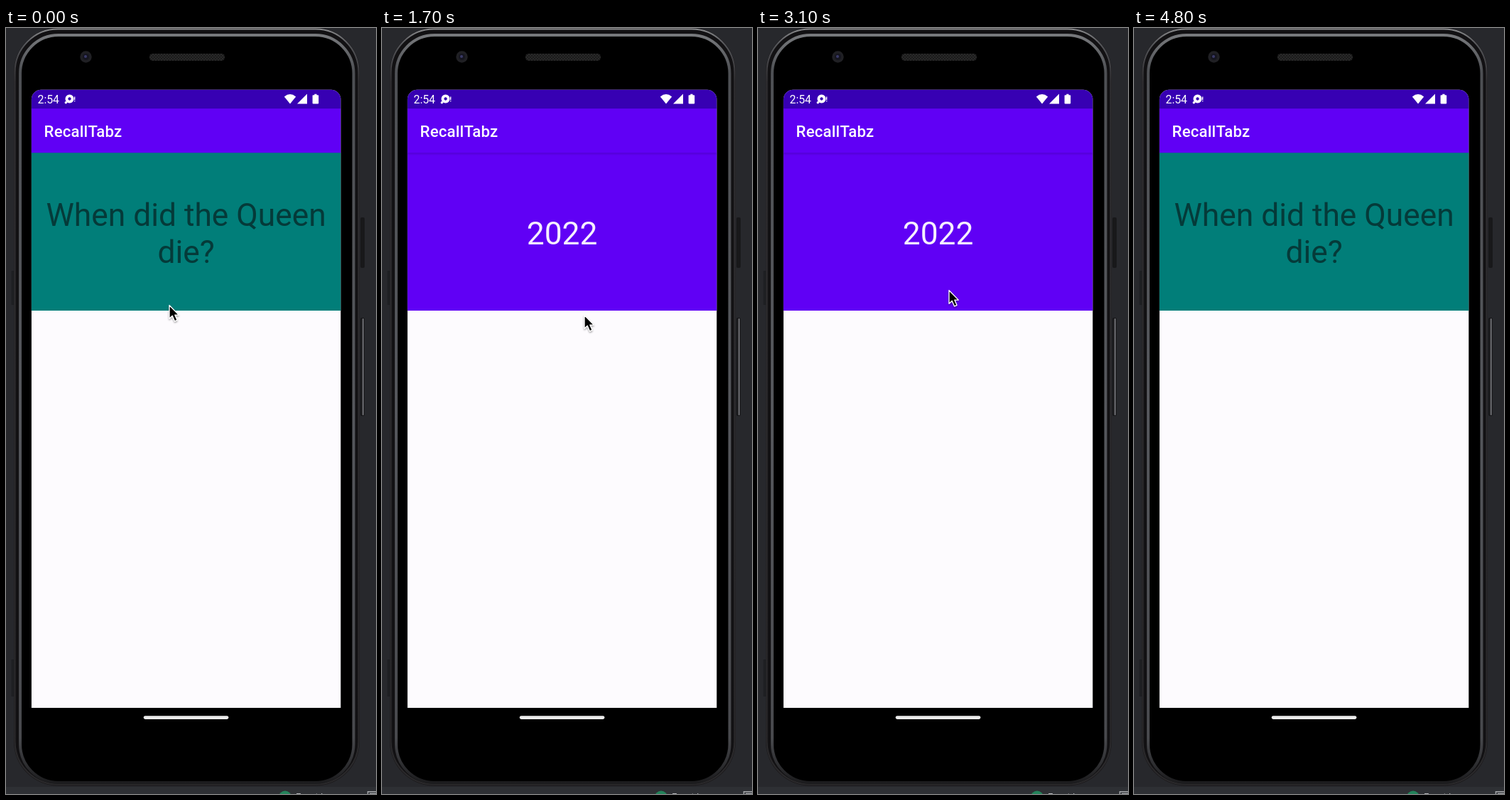
An HTML page for the animation above (4.9 s loop, 521x1076 px).

```html
<!DOCTYPE html>
<html lang="en">
<head>
<meta charset="utf-8">
<title>Flash card</title>
<style>
  html, body { margin: 0; width: 100%; height: 100%; overflow: hidden; background: #27282c; }
  svg { display: block; width: 521px; height: 1076px; font-family: Roboto, sans-serif; }
  .big { font-size: 44.34px; text-anchor: middle; }
</style>
</head>
<body>
<svg viewBox="0 0 521 1076">
  <defs>
    <linearGradient id="edge" x2="0" y2="1">
      <stop offset="0" stop-color="#8b8c8e"/>
      <stop offset=".02" stop-color="#55565a"/>
      <stop offset=".07" stop-color="#323134"/>
      <stop offset="1" stop-color="#2a292b"/>
    </linearGradient>
    <linearGradient id="rim" x2="0" y2="1">
      <stop offset="0" stop-color="#77797c"/>
      <stop offset=".05" stop-color="#4d4f53"/>
      <stop offset=".5" stop-color="#55575c"/>
      <stop offset=".94" stop-color="#48494d"/>
      <stop offset="1" stop-color="#1c1c1e"/>
    </linearGradient>
    <linearGradient id="shade" x2="0" y2="1">
      <stop offset="0" stop-color="#000" stop-opacity=".14"/>
      <stop offset="1" stop-color="#000" stop-opacity="0"/>
    </linearGradient>
    <pattern id="mesh" width="4" height="4" patternUnits="userSpaceOnUse">
      <rect width="4" height="4" fill="#292929"/>
      <path d="M0 0h2v2H0zM2 2h2v2H2z" fill="#1b1b1b"/>
    </pattern>
    <clipPath id="screen">
      <path d="M35.900 955V100.200a13.500 13.500 0 0 1 13.500-13.500H457.800a13.500 13.500 0 0 1 13.500 13.500V955z"/>
    </clipPath>
    <filter id="soft" x="-50%" y="-50%" width="200%" height="200%">
      <feDropShadow dx="0" dy="1.500" stdDeviation="1.200" flood-opacity=".4"/>
    </filter>
  </defs>

  <rect width="521" height="1076" fill="#27282c"/>
  <rect y="1066" width="521" height="10" fill="#2e3034"/>
  <circle cx="393" cy="1080.500" r="9" fill="#23835a"/>
  <text x="408" y="1083.500" font-size="13" fill="#b9bbbe">Event Log</text>
  <path d="M509.500 1077V1072.800H521M512 1075.500H521" fill="none" stroke="#a5a7aa" stroke-width="1.500"/>

  <!-- side keys -->
  <rect x="7.500" y="341" width="4" height="48" rx="1" fill="#1e1f22"/>
  <rect x="7.500" y="887" width="4" height="52" rx="1" fill="#1e1f22"/>
  <rect x="499" y="266" width="6" height="71" rx="2" fill="#18181a"/>
  <rect x="499" y="407" width="6" height="138" rx="2" fill="#161618"/>
  <rect x="501.500" y="408" width="2.500" height="136" rx="1" fill="#606165"/>

  <!-- body -->
  <rect x="11" y="0" width="487" height="1064.500" rx="62" fill="#1b191b"/>
  <rect x="12.500" y="1.500" width="484" height="1061" rx="60.500" fill="#121113" stroke="url(#edge)" stroke-width="2"/>
  <rect x="20" y="10" width="469.500" height="1050" rx="54" fill="#000" stroke="url(#rim)" stroke-width="4"/>

  <circle cx="112.500" cy="40.500" r="8.200" fill="#202024"/>
  <circle cx="112.500" cy="40.500" r="4.500" fill="#15151f"/>
  <circle cx="112" cy="40" r="2" fill="#3a3a68"/>
  <rect x="202" y="36" width="106" height="10" rx="4.500" fill="url(#mesh)"/>

  <g clip-path="url(#screen)">
    <rect x="35" y="86" width="437" height="870" fill="#fdfbfe"/>
    <rect x="35" y="86" width="437" height="28" fill="#3700b3"/>
    <rect x="35" y="113.200" width="437" height="63" fill="#6000f5"/>
    <g id="question">
      <rect x="35" y="175.300" width="437" height="221.700" fill="#017e79"/>
      <g class="big" fill="#053a39">
        <text x="253.600" y="277.600">When did the Queen</text>
        <text x="253.600" y="329.600">die?</text>
      </g>
    </g>
    <g id="answer" visibility="hidden">
      <rect x="35" y="175.300" width="437" height="221.700" fill="#6000f5"/>
      <rect x="35" y="175.300" width="437" height="4" fill="url(#shade)"/>
      <text class="big" x="253.600" y="303.700" fill="#f6effe">2022</text>
    </g>
  </g>

  <g fill="#fff">
    <text x="44.500" y="106" font-size="15.800">2:54</text>
    <path fill-rule="evenodd" d="M89.500 93.500a6 6 0 1 1-.01 0zM89.500 97.300a2.200 2.200 0 1 0 .01 0z"/>
    <circle cx="84.300" cy="104.700" r="1.700"/>
    <path d="M96 96.500h1.300v4.500H96zM96 102h1.300v1.300H96z"/>
    <path d="M391.800 96.400Q400 89.600 408.200 96.400L400 106.500z"/>
    <path d="M424 92.500V106.500H410z"/>
    <path d="M434.300 92.800h3.200v1.400h1.800q.9 0 .9.900v10.300q0 1.100-1.100 1.100h-6.400q-1.100 0-1.100-1.100V95.100q0-.9.900-.9h1.800z"/>
    <text x="53.600" y="153" font-size="22.170" font-weight="500" letter-spacing=".2">RecallTabz</text>
    <rect x="193.700" y="966.200" width="119.700" height="4.700" rx="2.350" fill="#ececec"/>
  </g>

  <g id="cursor" filter="url(#soft)">
    <path d="M1 1.500V20.200L5.200 16.300 8.500 23.800 12 22.300 8.800 15.100H14.300z" fill="#000" stroke="#fff" stroke-width="1.300" stroke-linejoin="round"/>
  </g>
</svg>
<script>
  const LOOP = 4900, TICK = 100;
  const FLIP = 1100, FLIP_BACK = 3200;

  // time, x, y of the pointer tip
  const path = [
    [0, 229, 388], [400, 263, 359], [1300, 263, 359], [1700, 284, 402],
    [1800, 296, 414], [2000, 296, 414], [2500, 292, 375], [2700, 292, 375],
    [3100, 268, 367], [3700, 268, 367], [4200, 285, 1080]
  ];
  const byId = id => document.getElementById(id);
  const question = byId('question'), answer = byId('answer'), cursor = byId('cursor');
  const show = (el, on) => el.setAttribute('visibility', on ? 'visible' : 'hidden');

  function tipAt(t) {
    const i = path.findIndex(p => p[0] > t);
    if (i < 0) return path[path.length - 1].slice(1);
    const [t0, x0, y0] = path[i - 1], [t1, x1, y1] = path[i];
    const k = (t - t0) / (t1 - t0), e = k * k * (3 - 2 * k);
    return [x0 + (x1 - x0) * e, y0 + (y1 - y0) * e];
  }

  function draw(now) {
    const t = Math.floor(now % LOOP / TICK) * TICK;
    const flipped = t >= FLIP && t < FLIP_BACK;
    show(question, !flipped);
    show(answer, flipped);
    show(cursor, t < 4200);
    cursor.setAttribute('transform', `translate(${tipAt(t)})`);
  }

  const start = performance.now();
  function loop() {
    draw(performance.now() - start);
    requestAnimationFrame(loop);
  }
  loop();
</script>
</body>
</html>
```
